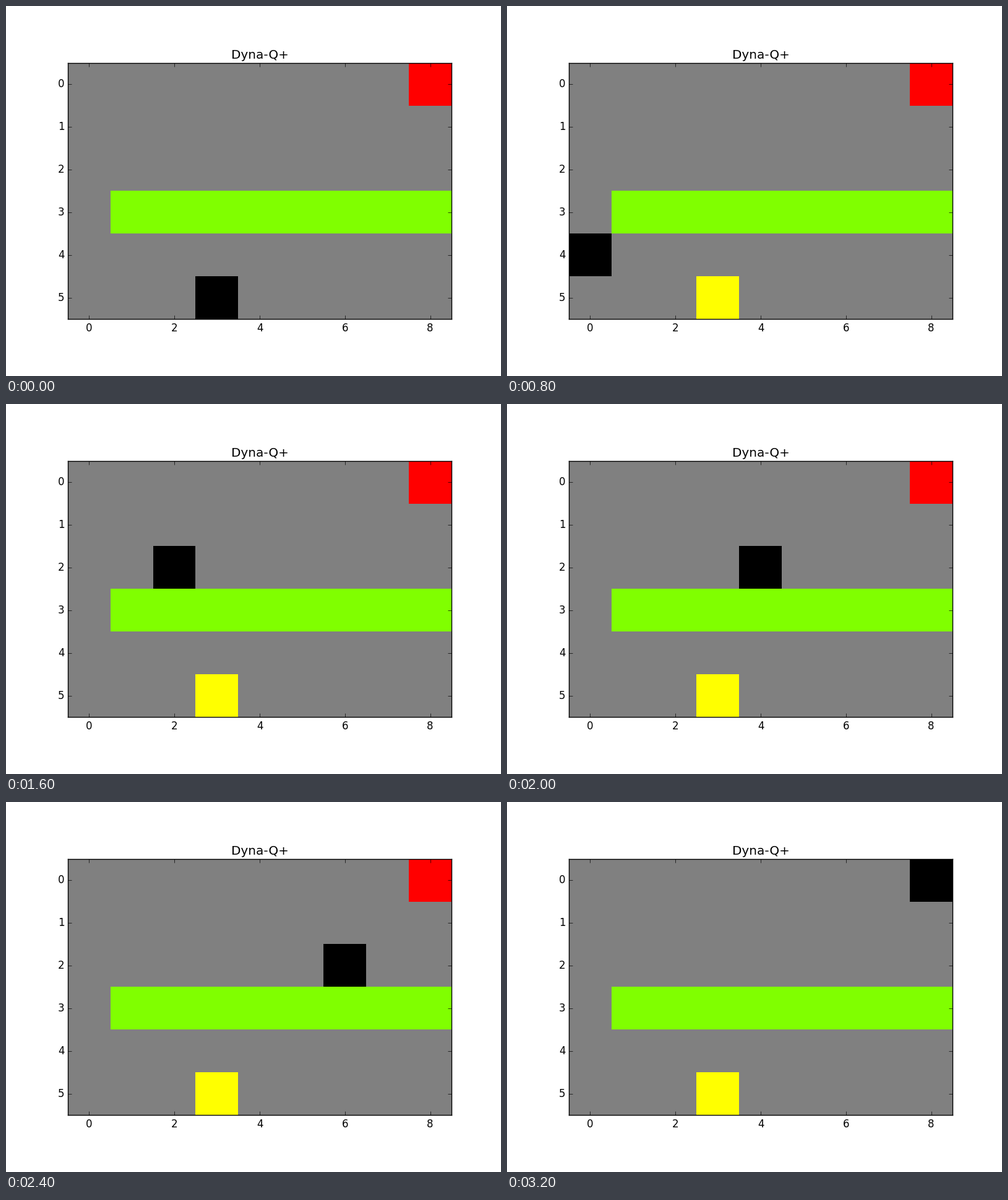
Recreate the animation shown at these times as a matplotlib script. Size 800x597 px, loop 3400 ms.

```python
import matplotlib.pyplot as plt
from matplotlib.animation import FuncAnimation
from matplotlib.patches import Rectangle

ROWS, COLS = 6, 9
START, GOAL = (5, 3), (0, 8)
STEP_MS = 200
PIXEL_SHIFT = 0.003  # keeps cell edges on the intended pixels

# (row, column) visited by the agent, one cell per step
PATH = (
    [START]
    + [(4, col) for col in (3, 2, 1, 0)]
    + [(3, 0)]
    + [(2, col) for col in range(COLS)]
    + [(1, 8), GOAL]
)

plt.style.use("classic")
plt.rcParams["font.family"] = "DejaVu Sans"

fig = plt.figure(figsize=(8, 5.97), dpi=100, facecolor="white")
ax = fig.add_axes([0.125, 0.1, 0.775, 0.8], facecolor="#808080")
ax.set_xlim(-0.5, COLS - 0.5)
ax.set_ylim(ROWS - 0.5, -0.5)
ax.set_aspect("equal")
ax.set_xticks(range(0, COLS, 2))
ax.set_yticks(range(ROWS))
ax.set_title("Dyna-Q+")


def corner(row, col):
    return col - 0.5 - PIXEL_SHIFT, row - 0.5 - PIXEL_SHIFT


def add_cell(cell, color, width=1):
    patch = Rectangle(corner(*cell), width, 1, facecolor=color, linewidth=0,
                      antialiased=False, snap=True)
    return ax.add_patch(patch)


add_cell((3, 1), "#80ff00", width=COLS - 1)
add_cell(START, "#ffff00")
add_cell(GOAL, "#ff0000")
agent = add_cell(START, "black")


def update(step):
    agent.set_xy(corner(*PATH[step]))
    return [agent]


anim = FuncAnimation(fig, update, frames=len(PATH), interval=STEP_MS,
                     repeat=True, repeat_delay=0)
plt.show()
```
